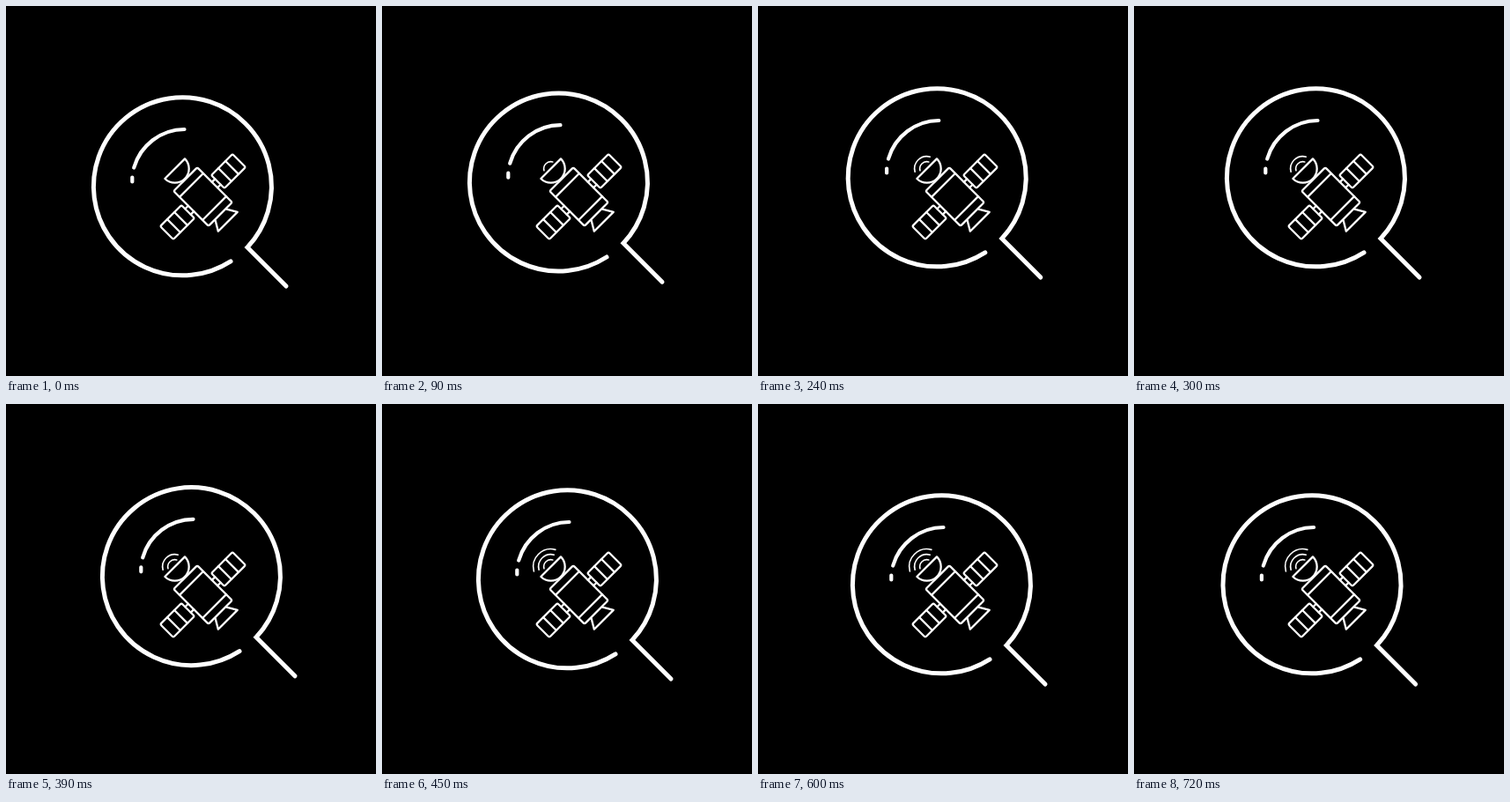
An HTML page that plays this animation: 420x420 px, repeating every 0.75 s.

```html
<!DOCTYPE html>
<html lang="en">
<head>
<meta charset="utf-8">
<title>Satellite search</title>
<style>
  html, body { margin: 0; width: 100%; height: 100%; overflow: hidden; background: #000; }
  svg { display: block; width: 100vw; height: 100vh; }
</style>
</head>
<body>
<svg viewBox="0 0 420 420" fill="none" stroke="#fff" stroke-linecap="round" stroke-linejoin="round">
  <defs>
    <g id="panel">
      <rect x="-10.5" y="-58" width="21" height="34" rx="2"/>
      <path d="M-10.5-46.7h21M-10.5-35.3h21M-4.5-24v5M4.5-24v5"/>
    </g>
  </defs>
  <g transform="translate(223.5 216.5) rotate(45)" stroke-width="2.3">
    <rect x="-28" y="-19" width="56" height="38" rx="2"/>
    <path d="M-18.5-19v38M18.5-19v38"/>
    <use href="#panel"/>
    <use href="#panel" transform="rotate(180)"/>
    <path d="M29-9L40-15.5V15.5L29 9"/>
    <path d="M-45-16V16A16 16 0 0 0-45-16Z"/>
    <g id="waves" stroke-width="1.6"></g>
  </g>
  <g id="lens" stroke-width="5">
    <path d="M255 289.8A101 101 0 1 1 274 274L318 318" stroke-linejoin="miter"/>
    <path d="M202.5 140A60 60 0 0 0 145.2 183.5M143.3 194.5L143.3 199.5" stroke-width="4.2"/>
  </g>
</svg>
<script>
const LOOP = 750, STEP = 30, SIDE = LOOP / 4, TRAVEL = 10;
const lens = document.getElementById('lens');
const waveBox = document.getElementById('waves');
const clamp = v => Math.max(0, Math.min(1, v));

// Arcs spread from the dish, opening away from the body.
const waves = [
  { r: 8, start: 50 },
  { r: 14, start: 235 },
  { r: 20, start: 420 }
].map(({ r, start }) => {
  const a = Math.PI / 3;
  const x = -45 - r * Math.cos(a), y = r * Math.sin(a);
  const el = document.createElementNS('http://www.w3.org/2000/svg', 'path');
  el.setAttribute('d', `M${x} ${y}A${r} ${r} 0 0 1 ${x} ${-y}`);
  waveBox.append(el);
  return { el, start };
});

// The lens follows a square path: up, right, down, left.
function draw(ms) {
  const t = Math.floor((ms % LOOP) / STEP) * STEP;
  const leg = n => clamp(t / SIDE - n);
  const x = TRAVEL * (leg(1) - leg(3));
  const y = TRAVEL * (leg(2) - leg(0));
  lens.setAttribute('transform', `translate(${x} ${y})`);
  for (const w of waves) w.el.style.display = t >= w.start ? '' : 'none';
}

const begin = performance.now();
function tick() {
  draw(performance.now() - begin);
  requestAnimationFrame(tick);
}
draw(0);
requestAnimationFrame(tick);
</script>
</body>
</html>
```
